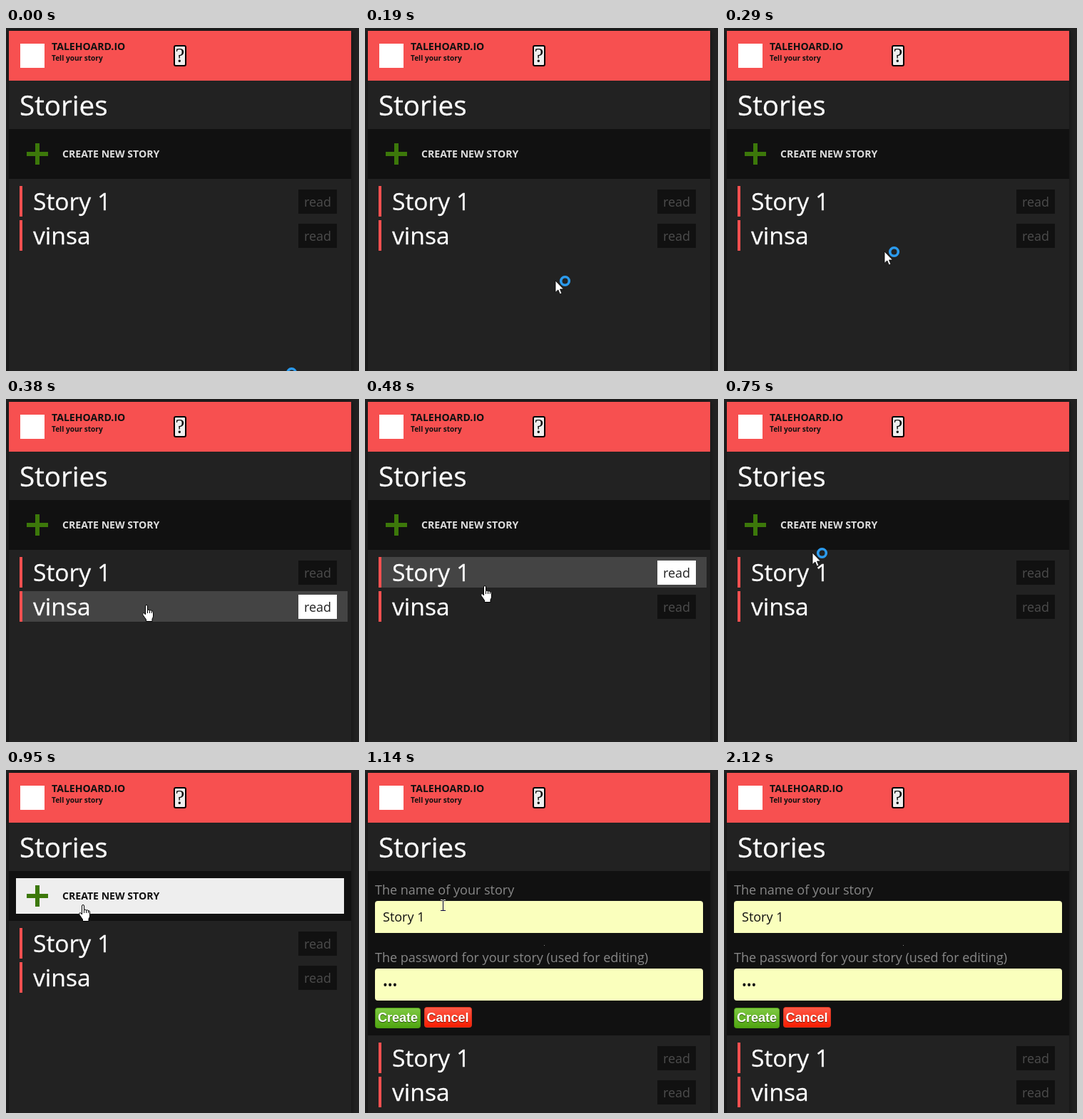
These frames come from a looping animation (495x482 px, 2.81 s). An HTML page:

```html
<!DOCTYPE html>
<html lang="en">
<head>
<meta charset="utf-8">
<title>Stories</title>
<style>
  html, body { margin: 0; width: 100%; height: 100%; overflow: hidden; background: #222; }
  svg { display: block; width: 100%; height: 100%; }
  text { font-family: "Open Sans", sans-serif; font-size: 18px; fill: #fff; }
  .panel { fill: #222; filter: drop-shadow(0 0 5px #0008); }
  .bold { font-weight: 700; font-size: 14.1px; }
  .heading { font-size: 38.6px; stroke: #fff; stroke-width: .3px; }
  .title { font-size: 33.6px; stroke: #fff; stroke-width: .3px; }
  .read { fill: #4c4c4c; }
  .dark { fill: #222; }
  .label { fill: #888; }
  .value { fill: #111; }
  .button { font: 700 18px "Liberation Sans", sans-serif; text-shadow: 0 1px 1px #0008; }
  .accent { fill: #f75050; }
  .bar { fill: #111; }

  .timed { animation: 2810ms step-end infinite; }
  .first-hover { animation-name: first-hover; }
  .second-hover { animation-name: second-hover; }
  .create-hover { animation-name: create-hover; }
  .create { animation-name: create; }
  .form { animation-name: form; }
  .list { animation-name: list; }
  .pointer { animation-name: pointer; }
  .busy { animation-name: busy; }
  .hand { animation-name: hand; }
  .caret { animation-name: caret; mix-blend-mode: difference; }

  @keyframes second-hover {
    0%, 17.08% { visibility: hidden }
    13.52% { visibility: visible }
  }
  @keyframes first-hover {
    0%, 26.69% { visibility: hidden }
    17.08% { visibility: visible }
  }
  @keyframes create-hover {
    0%, 40.56% { visibility: hidden }
    30.24% { visibility: visible }
  }
  @keyframes create {
    0% { visibility: visible }
    40.56%, 100% { visibility: hidden }
  }
  @keyframes form {
    0% { visibility: hidden }
    40.56%, 100% { visibility: visible }
  }
  @keyframes list {
    0% { transform: none }
    40.56%, 100% { transform: translateY(161px) }
  }
  @keyframes busy {
    0%, 26.69% { visibility: visible }
    13.52%, 30.24%, 100% { visibility: hidden }
  }
  @keyframes hand {
    0%, 26.69%, 40.56%, 100% { visibility: hidden }
    13.52%, 30.24% { visibility: visible }
  }
  @keyframes caret {
    0%, 75.44%, 100% { visibility: hidden }
    40.56% { visibility: visible }
  }
  @keyframes pointer {
    0% { transform: translate(387px, 484px) }
    3.2% { transform: translate(328px, 420px) }
    6.76% { transform: translate(267px, 355px) }
    10.32% { transform: translate(225px, 314px) }
    13.52% { transform: translate(197px, 289px) }
    17.08% { transform: translate(168px, 262px) }
    20.28% { transform: translate(146px, 240px) }
    23.84% { transform: translate(131px, 229px) }
    26.69% { transform: translate(124px, 216px) }
    30.24% { transform: translate(114px, 200px) }
    33.8%, 100% { transform: translate(108px, 189px) }
  }
</style>
</head>
<body>
<svg viewBox="0 0 495 482">
  <defs>
    <linearGradient id="green" x2="0" y2="1">
      <stop stop-color="#7fc943"/><stop offset="1" stop-color="#4fa510"/>
    </linearGradient>
    <linearGradient id="red" x2="0" y2="1">
      <stop stop-color="#ff5a48"/><stop offset="1" stop-color="#f81c00"/>
    </linearGradient>
    <g id="row">
      <rect class="accent" x="19" width="4" height="43"/>
      <rect class="bar" x="410" y="5" width="54" height="34"/>
      <text class="read" x="418" y="29">read</text>
    </g>
    <g id="row-hover">
      <rect x="23" width="456" height="43" fill="#444"/>
      <rect x="410" y="5" width="54" height="34" fill="#fff"/>
      <text class="dark" x="418" y="29">read</text>
    </g>
  </defs>

  <rect class="panel" x="4" y="4" width="480" height="520"/>
  <rect class="accent" x="4" y="4" width="480" height="70"/>
  <rect x="20" y="22" width="34" height="34" fill="#fff"/>
  <text class="bold value" x="64" y="31">TALEHOARD.IO</text>
  <text class="bold value" x="64" y="46" style="font-size:10.1px">Tell your story</text>
  <rect x="236" y="25" width="16" height="28" rx="2" fill="#eee" stroke="#000" stroke-width="2"/>
  <text class="value" x="244" y="48" text-anchor="middle" style="font:29px 'Liberation Serif',serif">?</text>
  <text class="heading" x="19" y="123">Stories</text>

  <g class="timed create">
    <rect class="bar" x="4" y="142" width="480" height="70"/>
    <text class="bold" x="79" y="182" style="fill:#ddd">CREATE NEW STORY</text>
  </g>
  <g class="timed create-hover">
    <rect x="14" y="152" width="460" height="50" fill="#eee"/>
    <text class="bold value" x="79" y="182">CREATE NEW STORY</text>
  </g>
  <path class="timed create" d="M41 162h6v12h12v6h-12v12h-6v-12h-12v-6h12z" fill="#3c780a"/>

  <g class="timed form">
    <rect class="bar" x="4" y="142" width="480" height="231"/>
    <text class="label" x="14" y="175">The name of your story</text>
    <path d="M14 229V188q0-4 4-4H470q4 0 4 4V229z" fill="#faffbd"/>
    <text class="value" x="25" y="213">Story 1</text>
    <rect x="251" y="246" width="1" height="1" fill="#888"/>
    <text class="label" x="14" y="270">The password for your story (used for editing)</text>
    <rect x="14" y="279" width="460" height="45" rx="4" fill="#faffbd"/>
    <text class="value" x="25" y="308">•••</text>
    <rect x="14.5" y="334.5" width="63" height="28" rx="3" fill="url(#green)" stroke="#4b9a14"/>
    <text class="button" x="18" y="354">Create</text>
    <rect x="83.5" y="333.5" width="66" height="28" rx="3" fill="url(#red)" stroke="#d93420"/>
    <text class="button" x="86.5" y="354">Cancel</text>
  </g>

  <g class="timed list">
    <g transform="translate(0 222)">
      <use href="#row"/>
      <use class="timed first-hover" href="#row-hover"/>
      <text class="title" x="38" y="34">Story 1</text>
    </g>
    <g transform="translate(0 270)">
      <use href="#row"/>
      <use class="timed second-hover" href="#row-hover"/>
      <text class="title" x="38" y="34">vinsa</text>
    </g>
  </g>

  <g class="timed pointer" fill="#fff" stroke="#000">
    <g class="timed busy">
      <path d="M0 0V16.5L3.8 13 6.3 19 9 18 6.5 12H11.5z" stroke-width=".8"/>
      <circle cx="13.5" cy=".5" r="5.8" fill="none" stroke="#2b9bee" stroke-width="3.6"/>
    </g>
    <g class="timed hand">
      <path d="M-1.5 14V2Q-1.5 .5 0 .5T1.5 2V7.5Q3 6.5 4.5 8 6 7 7.3 8.7 9.5 8 9.5 11V16Q9.5 18 8 20V23.5H-.5V21L-5 14.5Q-6 12-4 11.5-3 11.5-1.5 14z"/>
      <path d="M1.5 7.5V12M4.5 8V12M7.3 8.7V12"/>
    </g>
  </g>
  <path class="timed caret" d="M106 182.5H109M110 182.5H113M109.5 183V198M106 197.5H109M110 197.5H113" stroke="#fff"/>
</svg>
</body>
</html>
```
